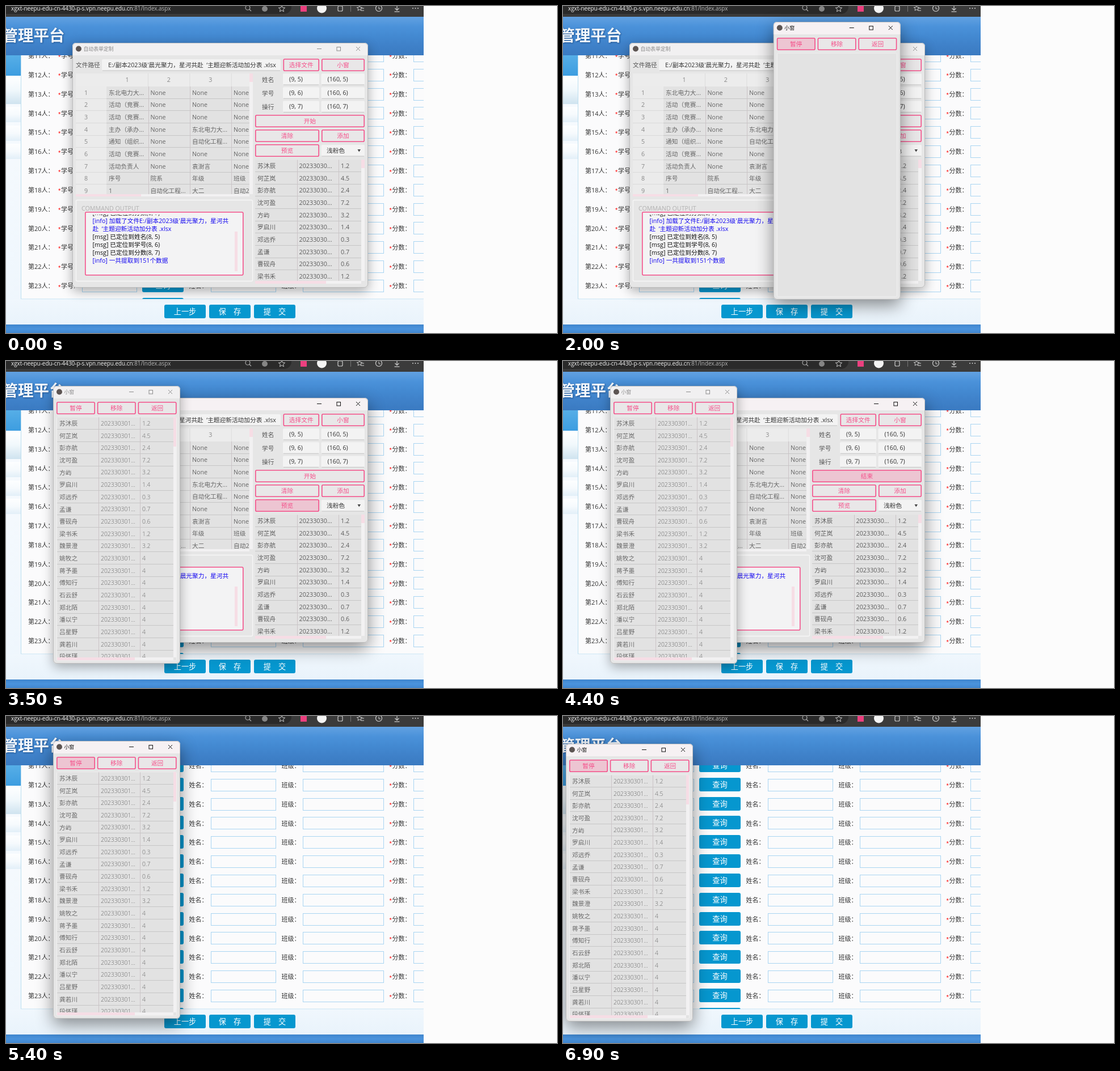
Recreate the animation shown at these times as an HTML page with a canvas. Size 971 by 577 pixels, loop 8 s.

```html
<!DOCTYPE html>
<html lang="zh-CN">
<head>
<meta charset="utf-8">
<title>自动表单定制</title>
<style>
html, body { margin: 0; width: 100%; height: 100%; overflow: hidden; background: #fcfcfc; }
canvas { display: block; }
</style>
</head>
<body>
<canvas id="stage" width="971" height="577"></canvas>
<script>
const ctx = document.getElementById('stage').getContext('2d');
const FONT = '"Open Sans", "Noto Sans CJK SC", "Noto Sans CJK", sans-serif';
const LOOP = 8000, STEP = 100, PITCH = 21.65;
const PINK = '#f4508a', PINK_FILL = '#edc5d2', PINK_BAR = '#f6dde5', BLUE = '#0697cf';

const names = ['苏沐辰', '何芷岚', '彭亦航', '沈可盈', '方屿', '罗启川', '邓远乔', '孟谦', '曹砚舟', '梁书禾',
  '魏景澄', '姚牧之', '蒋予墨', '傅知行', '石云舒', '郑北陌', '潘以宁', '吕星野', '龚若川', '段怀瑾'];
const scores = [1.2, 4.5, 2.4, 7.2, 3.2, 1.4, 0.3, 0.7, 0.6, 1.2, 3.2];
const people = id => names.map((n, i) => [n, id, String(scores[i] ?? 4)]);

const sheet = [
  ['东北电力大...', 'None', 'None', 'None'],
  ['活动（竞赛...', 'None', 'None', 'None'],
  ['活动（竞赛...', 'None', 'None', 'None'],
  ['主办（承办...', 'None', '东北电力大...', 'None'],
  ['通知（组织...', 'None', '自动化工程...', 'None'],
  ['活动（竞赛...', 'None', 'None', 'None'],
  ['活动负责人', 'None', '袁澍言', 'None'],
  ['序号', '院系', '年级', '班级'],
  ['1', '自动化工程...', '大二', '自动2']
];
const log = [
  ['[msg] 已定位到分数(8, 7)', 0],
  ["[info] 加载了文件E:/副本2023级'晨光聚力，星河共", 1],
  ['赴  ‘主题迎新活动加分表 .xlsx', 1],
  ['[msg] 已定位到姓名(8, 5)', 0],
  ['[msg] 已定位到学号(8, 6)', 0],
  ['[msg] 已定位到分数(8, 7)', 0],
  ['[info] 一共提取到151个数据', 1]
];

function text(s, x, y, size, color, align = 'left', weight = 400, family = FONT) {
  ctx.font = `${weight} ${size}px ${family}`;
  ctx.fillStyle = color;
  ctx.textAlign = align;
  ctx.fillText(s, x, y + size * 0.37);
}
function rect(x, y, w, h, color) {
  ctx.fillStyle = color;
  ctx.fillRect(x, y, w, h);
}
function fade(x, y, w, h, ...colors) {
  const g = ctx.createLinearGradient(0, y, 0, y + h);
  colors.forEach((c, i) => g.addColorStop(i / (colors.length - 1), c));
  rect(x, y, w, h, g);
}
function round(x, y, w, h, r, fill, stroke, line = 1) {
  ctx.beginPath();
  ctx.roundRect(x, y, w, h, r);
  if (fill) { ctx.fillStyle = fill; ctx.fill(); }
  if (stroke) { ctx.strokeStyle = stroke; ctx.lineWidth = line; ctx.stroke(); }
}
function path(points, color, width = 1) {
  ctx.beginPath();
  points.forEach(([x, y], i) => i ? ctx.lineTo(x, y) : ctx.moveTo(x, y));
  ctx.strokeStyle = color;
  ctx.lineWidth = width;
  ctx.stroke();
}
function circle(x, y, r, fill, stroke) {
  round(x - r, y - r, 2 * r, 2 * r, r, fill, stroke, 1.2);
}
function clipped(x, y, w, h, draw) {
  ctx.save();
  ctx.beginPath();
  ctx.rect(x, y, w, h);
  ctx.clip();
  draw();
  ctx.restore();
}

// ---- browser page ----
function star(x, y, r) {
  const pts = [];
  for (let i = 0; i <= 10; i++) {
    const a = -Math.PI / 2 + i * Math.PI / 5, d = i % 2 ? r * 0.45 : r;
    pts.push([x + d * Math.cos(a), y + d * Math.sin(a)]);
  }
  path(pts, '#c8c8c8');
}
function toolbar() {
  const ink = '#d0d0d0';
  rect(0, 0, 736, 19, '#3b3b3b');
  round(-20, -20, 523, 34, 13, '#2a2a2a');
  const host = 'xgxt-neepu-edu-cn-4430-p-s.vpn.neepu.edu.cn';
  text(host, 9, 4, 9.9, '#f2f2f2');
  text(':81/Index.aspx', 9 + ctx.measureText(host).width, 4, 9.9, '#b4b4b4');
  circle(426, 3, 4, null, '#a8a8a8');
  path([[429, 6], [432, 9]], '#a8a8a8', 1.2);
  circle(456, 5, 5, '#858585');
  star(486, 5, 6);
  rect(519, -1, 11, 11, '#ec407f');
  circle(556.5, 4, 8.5, '#f4f4f4');
  round(585, 0, 8, 9, 2, null, ink, 1.2);
  path([[607.5, 0], [607.5, 10]], '#777');
  star(623, 4, 5);
  path([[626, 4], [631, 4]], ink);
  path([[626, 8], [631, 8]], ink);
  circle(657, 4, 5.5, null, ink);
  path([[657, 1], [657, 5], [660, 5]], ink);
  path([[689, -1], [689, 7]], ink, 1.2);
  path([[685.5, 4], [689, 7.5], [692.5, 4]], ink, 1.2);
  path([[684.5, 10], [693.5, 10]], ink, 1.2);
  [717, 721.5, 726].forEach(x => circle(x, 4, 1, ink));
}
function blueButton(x, y, label) {
  round(x, y, 73, 24, 3, BLUE);
  text(label, x + 36.5, y + 12.3, 13.2, '#fff', 'center');
}
function field(x, y, w) {
  ctx.strokeStyle = '#a9d5f2';
  ctx.lineWidth = 1;
  ctx.strokeRect(x + 0.5, Math.round(y) - 10.5, w, 21);
}
function starred(label, x, y) {
  text('*', x, y + 1.5, 11, '#f00', 'left', 400, '"Liberation Sans", sans-serif');
  text(label, x + 5, y, 11, '#333');
}
function formRow(n) {
  const y = 121.8 + (n - 12) * 33.83;
  text(`第${n}人：`, 39, y, 11, '#333');
  starred('学号:', 92, y);
  field(134, y, 96);
  blueButton(240, Math.round(y - 13), '查询');
  text('姓名：', 322.5, y, 11, '#333');
  field(361, y, 114);
  text('班级：', 485.5, y, 11, '#333');
  field(523, y, 142);
  starred('分数：', 675.5, y);
  field(718, y, 40);
}
function page() {
  rect(0, 0, 971, 577, '#fcfcfc');
  clipped(0, 0, 736, 577, () => {
    fade(0, 87, 736, 474, '#f8fbfe', '#eef6fd');
    fade(0, 19, 736, 68, '#62a1e1', '#4b92da', '#4389d1', '#3f81c9', '#3a7ac1');
    toolbar();
    ctx.save();
    ctx.shadowColor = '#1d4f8c';
    ctx.shadowOffsetX = ctx.shadowOffsetY = 1;
    ctx.shadowBlur = 3;
    text('管理平台', 103.5, 52, 27.5, '#f4f8fc', 'right', 700);
    ctx.restore();
    fade(0, 87, 26, 36, '#56aee7', '#3d9de0');
    fade(0, 123, 26, 50, '#ffffff', '#f1f8fc', '#cfe3ef');
    [178, 211, 243].forEach(y => fade(0, y, 26, 27, '#fdfeff', '#f6fafd', '#e2eff8'));
    rect(26, 87, 710, 430, '#fbfbfc');
    path([[26.5, 87], [26.5, 517], [736, 517]], '#bcdff0');
    clipped(0, 87, 736, 430, () => {
      for (let n = 11; n <= 24; n++) formRow(n);
    });
    fade(0, 517.5, 736, 45, '#f0f7fd', '#e9f3fb');
    blueButton(279, 527, '上一步');
    blueButton(358, 527, '保　存');
    blueButton(437, 527, '提　交');
    fade(0, 562, 736, 15, '#4086cd', '#4a93dc', '#4288d0');
  });
}

// ---- shared window parts ----
function frame(x, y, w, h, title, active, barH) {
  ctx.save();
  ctx.shadowColor = active ? 'rgba(0,0,0,.45)' : 'rgba(0,0,0,.32)';
  ctx.shadowBlur = active ? 30 : 20;
  ctx.shadowOffsetY = active ? 10 : 6;
  round(x, y, w, h, 6, '#e6e6e6');
  ctx.restore();
  round(x, y, w, barH, [6, 6, 0, 0], active ? '#f6f1f3' : '#f1f0f1');
  round(x + 0.5, y + 0.5, w - 1, h - 1, 6, null, 'rgba(110,110,110,.35)');
  const ink = active ? '#111' : '#8c8c8c', cy = y + 10.5;
  circle(x + 11, cy, 5, '#5d5553');
  text(title, x + 19.5, cy, 8.9, ink);
  const r = x + w;
  path([[r - 90, cy], [r - 82, cy]], ink);
  ctx.strokeRect(r - 55, cy - 3, 6.5, 6.5);
  path([[r - 21, cy - 3.5], [r - 14, cy + 3.5]], ink);
  path([[r - 14, cy - 3.5], [r - 21, cy + 3.5]], ink);
}
function button(x, y, w, label, on) {
  round(x + 0.8, y + 0.8, w - 1.6, 20.4, 2, on ? PINK_FILL : '#e9e7e8', PINK, 1.6);
  text(label, x + w / 2, y + 11.3, 10.7, PINK, 'center');
}
function input(x, y, w, h, label, pad) {
  round(x, y, w, h, 2, '#f3f3f3');
  rect(x + 1, y + h - 0.5, w - 2, 1, '#c4c4c4');
  text(label, x + pad, y + h / 2, 10.7, '#333');
}
function grid(x, y, w, h, cols, rows, color, latin = 10.7, weight = 400) {
  clipped(x, y, w, h, () => {
    rect(x, y, w, h, '#e2e2e2');
    rows.forEach((row, i) => {
      const top = y + i * PITCH;
      row.forEach((s, c) =>
        text(s, cols[c] + 4, top + PITCH / 2, /^[\d.]+$/.test(s) ? latin : 10.7, color, 'left', weight));
      rect(x, Math.round(top + PITCH) - 1, w, 1, '#c6c6c6');
    });
    cols.slice(1).forEach(c => rect(Math.round(c), y, 1, h, '#cbc4c7'));
  });
}
function bar(x, y, w, h, thumb) {
  rect(x, y, w, h, '#f2f1f2');
  w > h ? rect(x, y, thumb, h, PINK_BAR) : rect(x, y, w, thumb, PINK_BAR);
}

// ---- main window ----
function leftTable() {
  rect(123, 119, 306, 23, '#ececec');
  rect(123, 142, 54, 190, '#ebebeb');
  ['1', '2', '3'].forEach((s, i) => {
    text(s, 213.5 + i * 73.4, 130.5, 10.7, '#888', 'center');
    rect(250 + i * 73.4, 119, 1, 23, '#dcdcdc');
  });
  clipped(123, 142, 54, 190, () => sheet.forEach((_, i) => {
    text(String(i + 1), 141, 142 + (i + 0.5) * PITCH, 10.7, '#888', 'center');
    rect(123, Math.round(142 + (i + 1) * PITCH) - 1, 54, 1, '#dadada');
  }));
  grid(177, 142, 252, 190, [177, 250.5, 324, 397], sheet, '#666');
  bar(429, 119, 6, 213, 15);
  bar(123, 332, 306, 4, 115);
}
function logPanel() {
  round(123.5, 342.5, 311, 143, 2, null, '#f6f6f6', 1.4);
  text('COMMAND OUTPUT', 133, 357.5, 10.7, '#b2b2b2');
  round(139.8, 363.8, 278, 111, 2, '#f3f3f4', PINK, 1.6);
  clipped(145, 368, 265, 104, () => log.forEach(([s, info], i) =>
    text(s, 152.5, 365 + i * 14, 10.7, info ? '#1508f0' : '#111')));
  rect(403, 398, 5, 70, PINK_BAR);
}
function mainWindow(s) {
  frame(117, 65, 521, 432, '自动表单定制', s.mainActive, 22);
  text('文件路径', 123, 104.5, 10.7, '#555');
  input(169, 94, 315, 20, "E:/副本2023级'晨光聚力，星河共赴  ‘主题迎新活动加分表 .xlsx", 11);
  leftTable();
  logPanel();
  button(488.5, 93, 63.5, '选择文件');
  button(556, 93, 76, '小窗', s.opening);
  ['姓名', '学号', '操行'].forEach((label, i) => {
    const y = 119 + i * 24.2;
    text(label, 451, y + 11, 10.7, '#555');
    input(488, y, 64, 20, `(9, ${i + 5})`, 11);
    input(555.5, y, 76.5, 20, `(160, ${i + 5})`, 11);
  });
  button(439, 192, 193, s.running ? '结束' : '开始', s.startOn);
  button(439, 218, 113, '清除');
  button(556, 218, 76, '添加');
  button(439, 244, 113, '预览', s.previewOn);
  input(555.5, 245, 76.5, 20, '浅粉色', 9.5);
  ctx.beginPath();
  ctx.moveTo(619.5, 253);
  ctx.lineTo(625, 253);
  ctx.lineTo(622.2, 257.5);
  ctx.fillStyle = '#444';
  ctx.fill();
  grid(439, 271.3, 187, 214, [439, 512.5, 586], people('20233030...'), '#5c5c5c', 10.8);
  bar(626, 271, 6, 214, 15);
  bar(439, 485, 187, 5, 125);
}

// ---- small window ----
function smallWindow(x, y, s) {
  ctx.save();
  ctx.translate(x, y);
  frame(0, 0, 224, 490, '小窗', !s.mainActive, 22);
  ['暂停', '移除', '返回'].forEach((label, i) =>
    button(6 + i * 71.8, 28, 68, label, !i && !s.mainActive));
  round(6.5, 55, 211, 430, 2, '#e3e3e3', '#f0f0f0');
  if (s.filled) {
    grid(7, 55.2, 205, 424, [7, 80, 153], people('202330301...'), '#686868', 10.4, 300);
    bar(212, 55, 5, 424, 52);
    bar(7, 479, 205, 5, 137);
  }
  ctx.restore();
}

// ---- timeline ----
const clamp = v => Math.max(0, Math.min(1, v));
const ease = k => k * k * k * (10 - 15 * k + 6 * k * k);
const span = (t, from, to) => ease(clamp((t - from) / (to - from)));
const mix = (a, b, k) => a + (b - a) * k;

function scaled(cx, cy, k, alpha, draw) {
  ctx.save();
  ctx.globalAlpha = alpha;
  ctx.translate(cx, cy);
  ctx.scale(k, k);
  ctx.translate(-cx, -cy);
  draw();
  ctx.restore();
}

function render(t) {
  const s = {
    opening: t === 900,
    mainActive: t === 900 || (t >= 3400 && t < 5200),
    previewOn: t >= 3400 && t < 4300,
    startOn: t >= 4300,
    running: t >= 4400,
    filled: t >= 3500
  };
  page();
  if (t < 5400) {
    const m = Math.max(0, (t - 5100) / 100);
    scaled(377.5, 281, 1 - 0.0093 * m ** 4, 1 - 0.05 * m ** 3, () => {
      ctx.translate(0, 4 * m ** 4);
      mainWindow(s);
    });
  }
  if (t >= 1000) {
    const a = span(t, 1900, 2400), b = span(t, 6100, 6500);
    const x = mix(mix(388.5, 83, a), 5, b), y = mix(mix(27, 44, a), 49, b);
    const k = 1 - (1 - clamp((t - 900) / 400)) ** 3;
    scaled(x + 112, y + 245, mix(0.88, 1, k), k, () => smallWindow(x, y, s));
  }
}

let last = -1;
function tick(now) {
  const t = Math.floor(now % LOOP / STEP) * STEP;
  if (t !== last) render(last = t);
  requestAnimationFrame(tick);
}
render(0);
requestAnimationFrame(tick);
</script>
</body>
</html>
```
